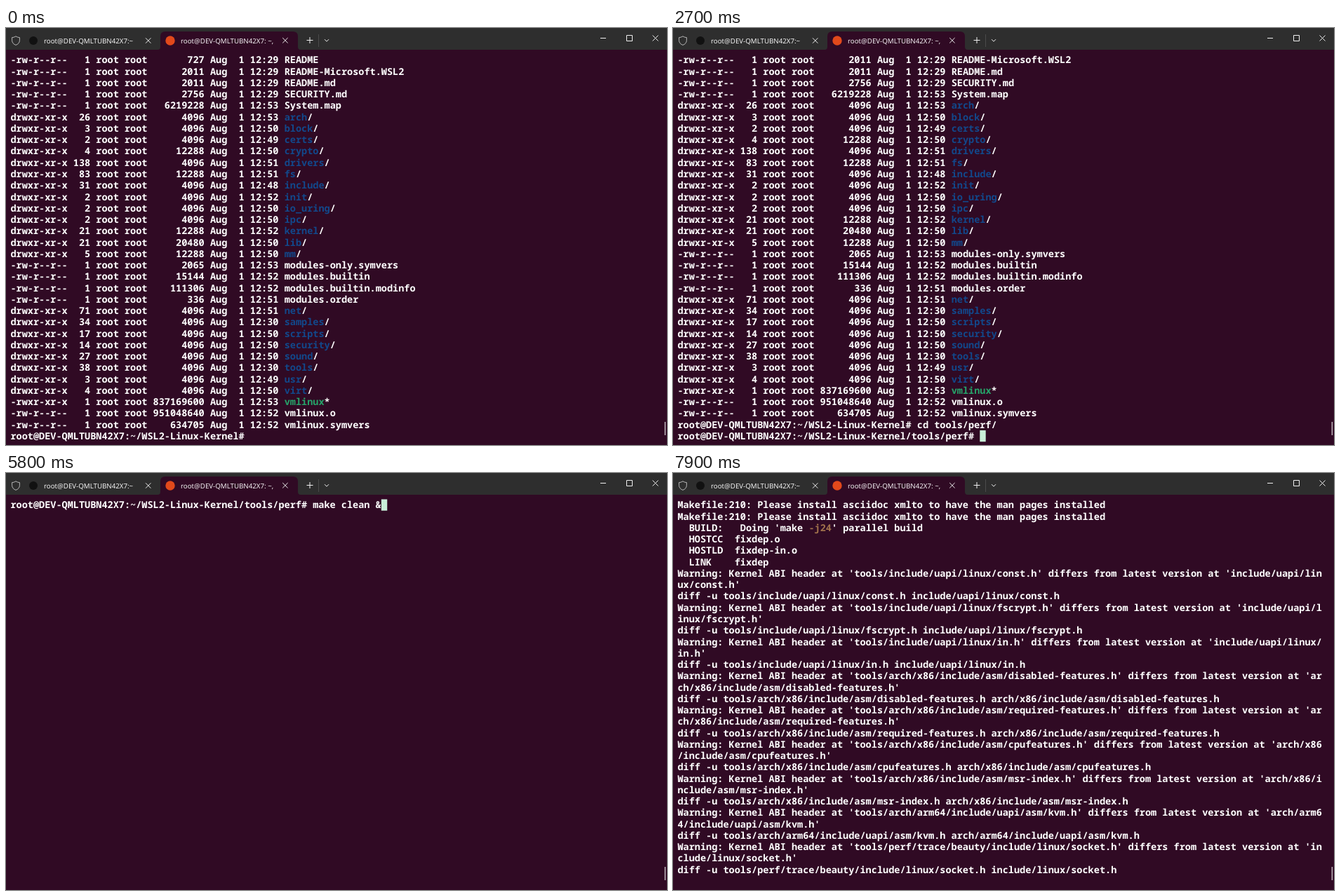
These frames come from a looping animation (942x595 px, 8000 ms). An HTML page:

```html
<!DOCTYPE html>
<html lang="en">
<head>
<meta charset="utf-8">
<title>Terminal</title>
<style>
  html, body { margin: 0; width: 100%; height: 100%; overflow: hidden; background: #300a24; }
  svg { display: block; width: 942px; height: 595px; }
  text { white-space: pre; text-rendering: geometricPrecision; font-variant-ligatures: none; }
  #rows { font: 600 13.55px "Noto Sans Mono", "DejaVu Sans Mono", monospace; fill: #fff; }
  .tab { font: 9.75px "Open Sans", "Noto Sans", sans-serif; fill: #fff; }
  .line { fill: none; stroke: #f0f0f0; stroke-width: 1; }
</style>
</head>
<body>
<svg viewBox="0 0 942 595">
  <rect width="942" height="595" fill="#300a24"/>
  <rect width="942" height="31" fill="#2e2e2e"/>
  <path d="M216 31q4 0 4-4V12q0-7 7-7H409q7 0 7 7V27q0 4 4 4z" fill="#300a24"/>
  <path d="M14 11.8q2.6 1.8 5.4 1.8v4q0 4.6-5.4 6.8q-5.4-2.2-5.4-6.8v-4q2.8 0 5.4-1.8z" class="line" stroke-opacity=".7"/>
  <circle cx="39" cy="18" r="6" fill="#111"/>
  <circle cx="234" cy="18" r="6.7" fill="#e2491b"/>
  <text class="tab" x="54" y="22">root@DEV-QMLTUBN42X7:~</text>
  <text class="tab" x="249" y="22">root@DEV-QMLTUBN42X7: ~,</text>
  <path class="line" d="M199 14.3l7.4 7.4m0-7.4l-7.4 7.4M394.2 14l7.4 7.4m0-7.4l-7.4 7.4"/>
  <path class="line" d="M428.5 17.5h9m-4.5-4.5v9M454 16.2l3 3l3-3"/>
  <path class="line" d="M445.5 9v18" stroke-opacity=".15"/>
  <path class="line" d="M847 14.5h8M884.5 10.5h8v8h-8zM921.5 10.5l8 8m0-8l-8 8"/>
  <rect x="938.6" y="562" width="1.5" height="19" fill="#c4b8c0"/>
  <g id="rows"></g>
  <rect id="cursor" width="8.4" height="16.2" fill="#c9f0d9"/>
</svg>
<script>
const LOOP = 8000, ROWS = 34, COLS = 113;
const LEFT = 6.4, TOP = 37.5, CELL = 8.13, PITCH = 16.26, BASE = 12.9;
const BLUE = "#12488b", GREEN = "#26a269", BROWN = "#a2734c";
const NS = "http://www.w3.org/2000/svg";

// links, size, time, name
const listing = `1 727 12:29 README
1 2011 12:29 README-Microsoft.WSL2
1 2011 12:29 README.md
1 2756 12:29 SECURITY.md
1 6219228 12:53 System.map
26 4096 12:53 arch/
3 4096 12:50 block/
2 4096 12:49 certs/
4 12288 12:50 crypto/
138 4096 12:51 drivers/
83 12288 12:51 fs/
31 4096 12:48 include/
2 4096 12:52 init/
2 4096 12:50 io_uring/
2 4096 12:50 ipc/
21 12288 12:52 kernel/
21 20480 12:50 lib/
5 12288 12:50 mm/
1 2065 12:53 modules-only.symvers
1 15144 12:52 modules.builtin
1 111306 12:52 modules.builtin.modinfo
1 336 12:51 modules.order
71 4096 12:51 net/
34 4096 12:30 samples/
17 4096 12:50 scripts/
14 4096 12:50 security/
27 4096 12:50 sound/
38 4096 12:30 tools/
3 4096 12:49 usr/
4 4096 12:50 virt/
1 837169600 12:53 vmlinux*
1 951048640 12:52 vmlinux.o
1 634705 12:52 vmlinux.symvers`.split("\n").map(listRow);

// A line is a list of [text, colour] runs.
function listRow(entry) {
  const [links, size, time, name] = entry.split(" ");
  const [, stem, mark] = name.match(/^(.*?)([/*]?)$/);
  const mode = { "/": "drwxr-xr-x", "*": "-rwxr-xr-x" }[mark] || "-rw-r--r--";
  const colour = { "/": BLUE, "*": GREEN }[mark];
  const head = `${mode} ${links.padStart(3)} root root ${size.padStart(9)} Aug  1 ${time} `;
  return [[head], [stem, colour], [mark]];
}

const plain = s => [[s]];
const wrap = s => s.match(new RegExp(`.{1,${COLS}}`, "g")).map(plain);

function warning(path, copy = "tools/" + path) {
  return [
    ...wrap(`Warning: Kernel ABI header at '${copy}' differs from latest version at '${path}'`),
    ...wrap(`diff -u ${copy} ${path}`)
  ];
}

const manNote = plain("Makefile:210: Please install asciidoc xmlto to have the man pages installed");
const build = [
  plain("  CLEAN   x86"),
  manNote,
  manNote,
  [["  BUILD:   Doing 'make "], ["-j24", BROWN], ["' parallel build"]],
  plain("  HOSTCC  fixdep.o"),
  plain("  HOSTLD  fixdep-in.o"),
  plain("  LINK    fixdep"),
  ...["const", "fscrypt", "in"].flatMap(n => warning(`include/uapi/linux/${n}.h`)),
  ...["disabled-features", "required-features", "cpufeatures", "msr-index"]
    .flatMap(n => warning(`arch/x86/include/asm/${n}.h`)),
  ...warning("arch/arm64/include/uapi/asm/kvm.h"),
  ...warning("include/linux/socket.h", "tools/perf/trace/beauty/include/linux/socket.h")
];

const home = "root@DEV-QMLTUBN42X7:~/WSL2-Linux-Kernel";
const prompt1 = home + "# ", prompt2 = home + "/tools/perf# ";

const cdKeys = ["c", "d", " ", "t", "o", "ols/", "p", "e", "r", "f/"];
const cdTimes = [400, 600, 700, 1000, 1300, 1400, 1900, 2000, 2100, 2300];
const makeKeys = [..."make clean && make"];
const makeTimes = [3600, 3700, 3800, 4000, 4400, 4600, 4700, 4800, 4900, 5000,
  5200, 5800, 6000, 6100, 6400, 6600, 6700, 6800];
const buildSteps = [[7300, 1], [7400, 2], [7500, 3], [7600, 4], [7700, 6], [7800, 7], [7900, build.length]];
const ENTER = 2700, CLEAR = 3400, RUN = 7300;

const typed = (keys, times, t) => keys.filter((k, i) => t >= times[i]).join("");

function linesAt(t) {
  const second = plain(prompt2 + typed(makeKeys, makeTimes, t));
  if (t >= RUN) {
    const count = buildSteps.filter(s => t >= s[0]).pop()[1];
    return [second, ...build.slice(0, count), plain("")];
  }
  if (t >= CLEAR) return [second];
  const first = plain(prompt1 + typed(cdKeys, cdTimes, t));
  return t >= ENTER ? [...listing, first, second] : [...listing, first];
}

const rowsBox = document.getElementById("rows");
const cursor = document.getElementById("cursor");
const rows = Array.from({ length: ROWS }, (_, r) => {
  const row = document.createElementNS(NS, "text");
  row.setAttribute("y", TOP + PITCH * r + BASE);
  rowsBox.append(row);
  return row;
});

function fillRow(row, runs) {
  let col = 0;
  row.replaceChildren(...runs.filter(run => run[0]).map(([text, colour]) => {
    const span = document.createElementNS(NS, "tspan");
    span.setAttribute("x", LEFT + CELL * col);
    if (colour) span.setAttribute("fill", colour);
    span.textContent = text;
    col += text.length;
    return span;
  }));
}

let shown = -1;
function draw(t) {
  const tick = Math.floor(t / 100) * 100;
  if (tick === shown) return;
  shown = tick;
  const lines = linesAt(tick).slice(-ROWS);
  rows.forEach((row, r) => fillRow(row, lines[r] || []));
  const last = lines.length - 1;
  cursor.setAttribute("x", LEFT + CELL * lines[last][0][0].length);
  cursor.setAttribute("y", TOP + PITCH * last);
  cursor.setAttribute("visibility", tick >= 200 && tick < 7900 ? "visible" : "hidden");
}

const start = performance.now();
function loop() {
  draw((performance.now() - start) % LOOP);
  requestAnimationFrame(loop);
}
loop();
</script>
</body>
</html>
```
